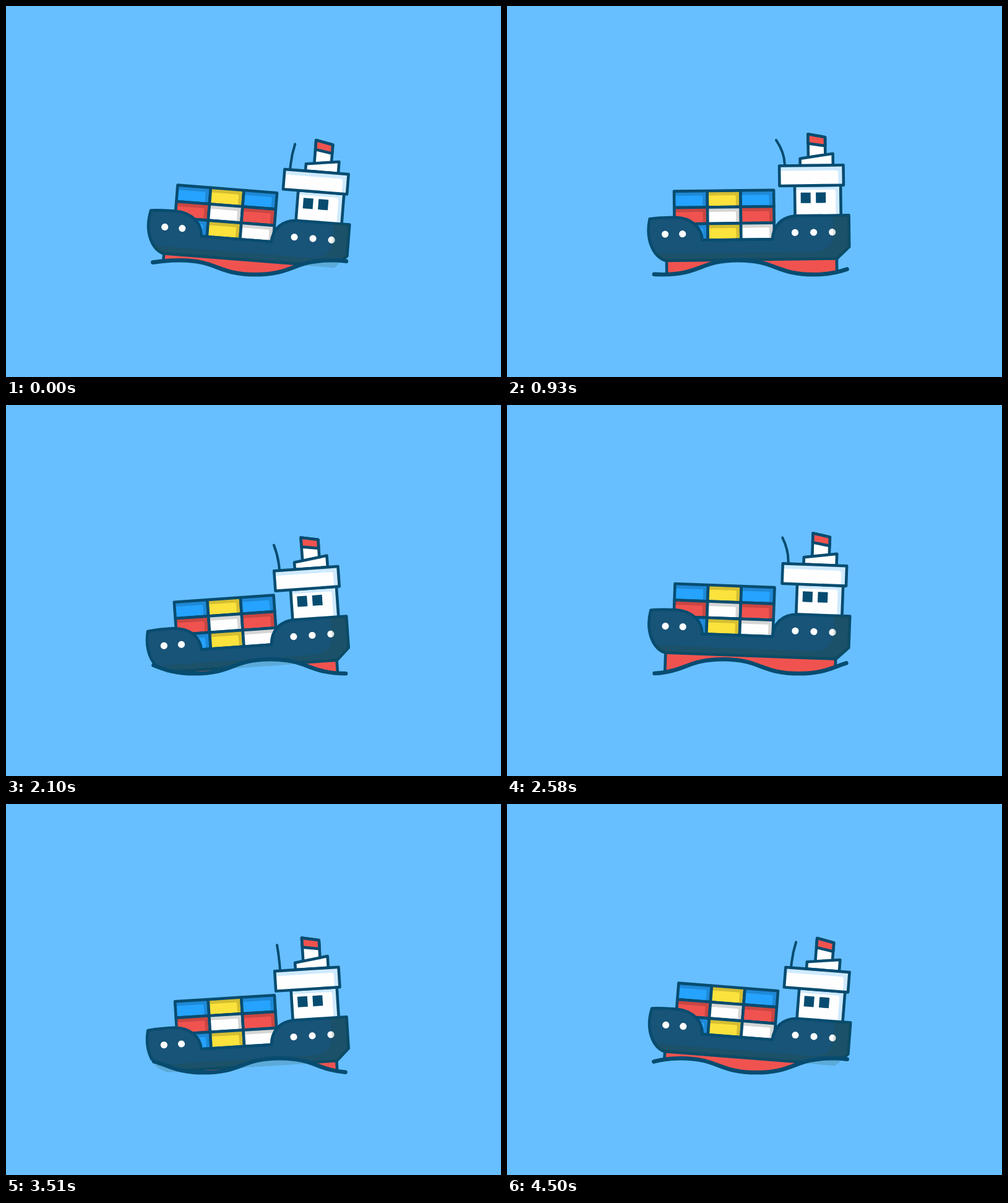
Animation, 800 px wide and 600 px high, one loop 4.53 s. Source, as an HTML page without scripts:

```html
<!DOCTYPE html>
<html lang="en">
<head>
<meta charset="utf-8">
<title>Cargo ship</title>
<style>
  /* --p counts swells: one swell is 1.5 s, advanced in 30 ms ticks */
  @property --p { syntax: "<number>"; inherits: true; initial-value: 0; }
  @keyframes sail { from { --p: 0; } to { --p: 3.02; } }

  html, body { margin: 0; width: 100%; height: 100%; overflow: hidden; background: #67bfff; }
  svg {
    display: block; width: 800px; height: 600px;
    --ink: #074c70; --blue: #25a3ff; --yellow: #fce23c; --red: #f0534f; --white: #fefefe;
    animation: sail 4.53s steps(151) infinite;
  }
  svg * { --turn: calc(var(--p) * 360deg); }

  .rock {
    transform-origin: 390.6px 379.4px;
    transform: translateY(calc(.4px + 10.2px * cos(var(--turn) - 110deg)))
               rotate(calc(.54deg + 4.57deg * cos(var(--turn) + 31deg)));
  }
  .slide { transform: translateX(calc(1.8px + 4.95px * cos(var(--turn) - 111deg))); }
  .whip {
    transform-origin: 450.3px 262px;
    transform: scaleX(calc(1.01 * cos(var(--turn) - 37.5deg) - .33));
    vector-effect: non-scaling-stroke;
  }
  .swell { transform: translateX(calc(-245px * var(--p))); }
  .line {
    fill: none; stroke: var(--ink); stroke-width: 6.6; stroke-linecap: round;
    stroke-dasharray: 311 3000;
    stroke-dashoffset: calc(-80px - 245px * var(--p));
  }

  .ink { stroke: var(--ink); stroke-width: 4.6; stroke-linejoin: round; stroke-linecap: round; }
  .blue { fill: var(--blue); }
  .yellow { fill: var(--yellow); }
  .red { fill: var(--red); }
  .white { fill: var(--white); }
  .tint { fill: #cfeaff; }
  .dark { fill: var(--ink); }
  .hull { fill: #185378; }
  .none { fill: none; }
</style>
</head>
<body>
<svg viewBox="0 0 800 600">
  <defs>
    <clipPath id="above">
      <path class="swell" d="M158 0V434.3s61.25-23 122.5-23 61.25 23 122.5 23 61.25-23 122.5-23 61.25 23 122.5 23 61.25-23 122.5-23 61.25 23 122.5 23 61.25-23 122.5-23 61.25 23 122.5 23 61.25-23 122.5-23 61.25 23 122.5 23V0z"/>
    </clipPath>
    <g id="box">
      <rect width="53.7" height="26.5"/>
      <path d="M0 0H53.7V26.5H46V9.5Q46 7.5 44 7.5H0z" fill="#000" fill-opacity=".16"/>
      <rect class="ink none" width="53.7" height="26.5"/>
    </g>
    <circle id="port" class="white" cy="371" r="5.6"/>
  </defs>

  <g clip-path="url(#above)">
    <g class="rock">
      <g class="slide">
        <g transform="translate(271 301.8)">
          <use href="#box" class="blue"/>
          <use href="#box" class="yellow" x="53.7"/>
          <use href="#box" class="blue" x="107.4"/>
          <use href="#box" class="red" y="26.5"/>
          <use href="#box" class="white" x="53.7" y="26.5"/>
          <use href="#box" class="red" x="107.4" y="26.5"/>
          <use href="#box" class="blue" y="53"/>
          <use href="#box" class="yellow" x="53.7" y="53"/>
          <use href="#box" class="white" x="107.4" y="53"/>
        </g>
      </g>

      <!-- bridge -->
      <path class="whip ink none" style="stroke-width:4" d="M450.3 262q0-21 10-41"/>
      <path class="ink white" d="M488.5 212L516 217.3V252H488.5z"/>
      <path class="ink red" d="M488.5 212L516 217.3V231.3L488.5 227z"/>
      <path class="ink white" d="M475.2 251.3L528.3 244V262.8H475.2z"/>
      <rect class="tint" x="466" y="295" width="74.2" height="52"/>
      <path class="white" d="M466 302H528Q532 302 532 306V347H466z"/>
      <rect class="ink none" x="466" y="295" width="74.2" height="52"/>
      <path class="dark" d="M475.5 306.5h16v17h-16zM500 306.5h16v17h-16z"/>
      <rect class="tint" x="441.5" y="262.8" width="103.5" height="32.4"/>
      <path class="white" d="M441.5 271H532Q536.5 271 536.5 275.5V295.2H441.5z"/>
      <rect class="ink none" x="441.5" y="262.8" width="103.5" height="32.4"/>

      <!-- keel and hull -->
      <rect class="ink red" x="257.5" y="412" width="275" height="50"/>
      <path class="ink hull" d="M231 346C245 344 260 344 272 344C300 345 315 362 315.5 381.4H429C430 362 442 344.3 470 344H553V395L533 413.8H256C238 408 223 382 231 346z"/>
      <use href="#port" x="255.6"/>
      <use href="#port" x="283.8"/>
      <use href="#port" x="465.6"/>
      <use href="#port" x="495.7"/>
      <use href="#port" x="525.8"/>
    </g>
  </g>

  <path class="rock" fill="#2b4a2b" fill-opacity=".18" d="M527.5 344H553.5V395.5L533.5 415.5H258Q246 410 238 402.5H493Q527.5 402.5 527.5 371z"/>

  <path class="swell line" pathLength="1225" d="M158 434.3s61.25-23 122.5-23 61.25 23 122.5 23 61.25-23 122.5-23 61.25 23 122.5 23 61.25-23 122.5-23 61.25 23 122.5 23 61.25-23 122.5-23 61.25 23 122.5 23 61.25-23 122.5-23 61.25 23 122.5 23"/>
</svg>
</body>
</html>
```
